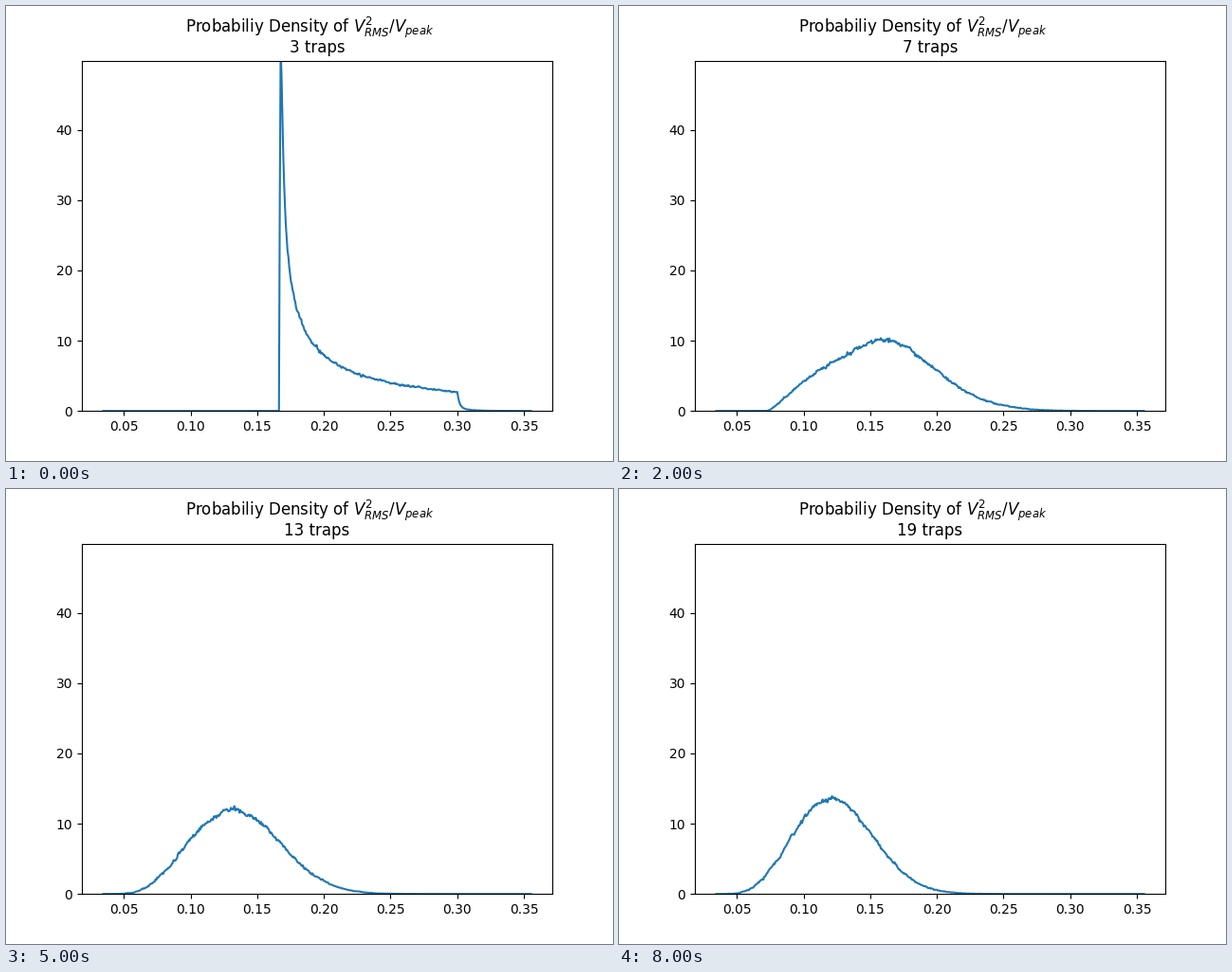
Recreate the animation shown at these times as a matplotlib script. Size 640 by 480 pixels, loop 8.5 s.

```python
import numpy as np
import matplotlib.pyplot as plt
from matplotlib.animation import FuncAnimation

TRAPS = range(3, 20)
BINS = 500
LOW, HIGH = 0.0344, 0.3553
DRAWS = 1_000_000
GRID_POINTS = 8_000_000
OVERSAMPLE = 8

rng = np.random.default_rng(7)
x = np.linspace(LOW, HIGH, BINS)
step = x[1] - x[0]
edges = np.linspace(LOW - step / 2, HIGH + step / 2, BINS + 1)


def peak_power(n, count):
    """Peak squared envelope of n equally spaced tones with random phases."""
    size = OVERSAMPLE * n
    phases = 2 * np.pi * rng.random((count, n), dtype=np.float32)
    tones = np.exp(1j * phases).astype(np.complex64)
    k, j = np.arange(n)[:, None], np.arange(size)
    signal = tones @ np.exp(2j * np.pi * k * j / size).astype(np.complex64)
    power = signal.real ** 2 + signal.imag ** 2

    # Refine the sampled maximum with a parabola through its neighbours.
    rows, top = np.arange(count), power.argmax(axis=1)
    mid = power[rows, top].astype(float)
    left = power[rows, (top - 1) % size]
    right = power[rows, (top + 1) % size]
    bend = np.maximum(2 * mid - left - right, 1e-6)
    return np.minimum(mid + (right - left) ** 2 / (8 * bend), n * n)


def density(n):
    count = GRID_POINTS // (OVERSAMPLE * n)
    repeats = -(-DRAWS // count)
    ratio = np.tile(n / 2 / peak_power(n, count), repeats)
    # Finite time sampling misses a little of each peak.
    scale = np.where(rng.random(ratio.size) < 0.15, 0.033, 0.0055 * n / 3)
    ratio *= 1 + scale * rng.standard_exponential(ratio.size)
    hits, _ = np.histogram(ratio, edges)
    return hits / (ratio.size * step)


curves = [density(n) for n in TRAPS]

fig, ax = plt.subplots(figsize=(6.4, 4.8), dpi=100)
fig.suptitle(r"Probabiliy Density of $V_{RMS}^2/V_{peak}$")
line, = ax.plot(x, curves[0])
ax.set_ylim(0, 49.85)
title = ax.set_title("")


def draw(i):
    line.set_ydata(curves[i])
    title.set_text(f"{TRAPS[i]} traps")
    return line, title


anim = FuncAnimation(fig, draw, frames=len(TRAPS), interval=500,
                     repeat=True, repeat_delay=0)
plt.show()
```
